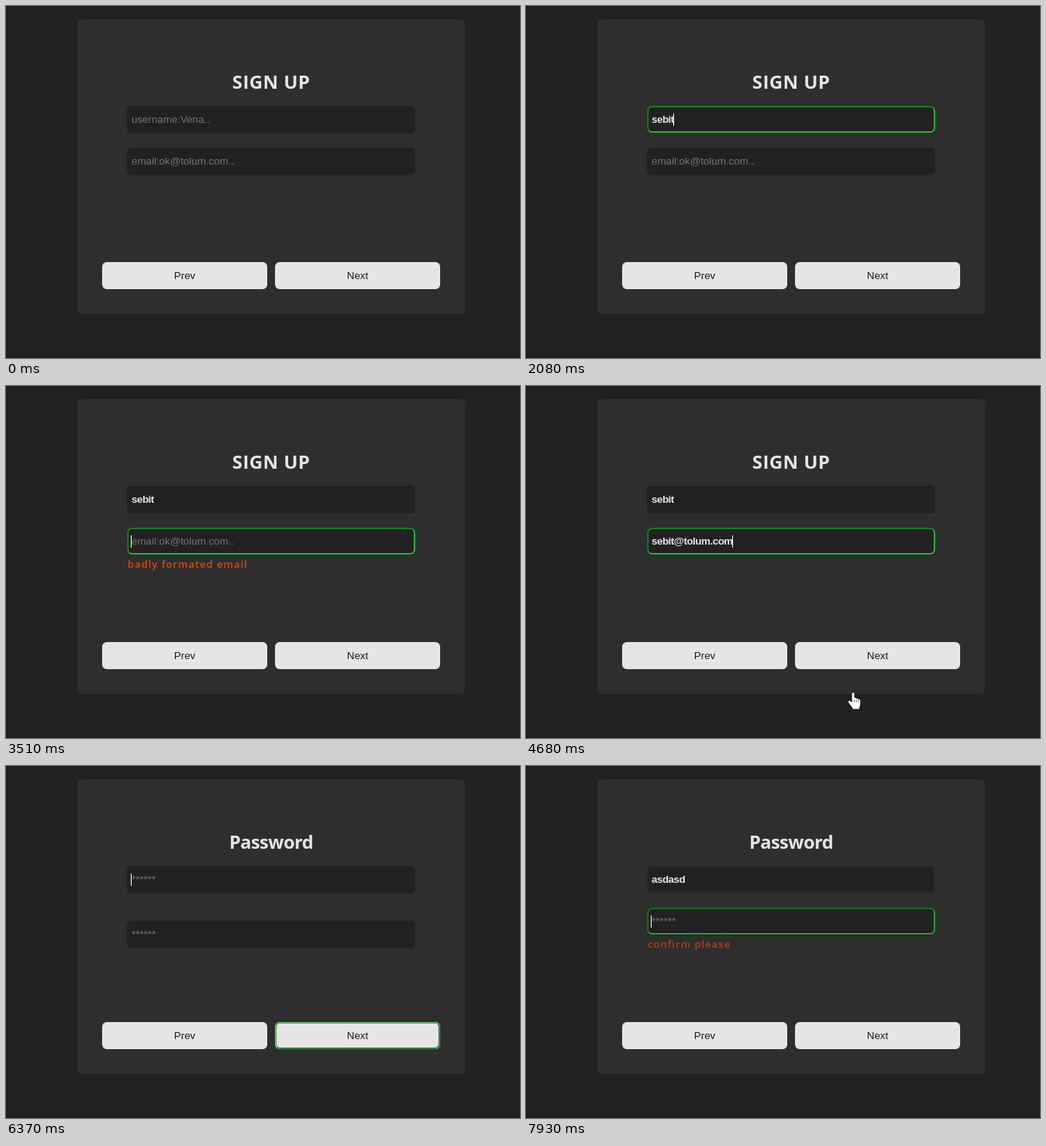
Recreate the animation shown at these times as an HTML page with a canvas. Size 663 by 455 pixels, loop 8 s.

```html
<!DOCTYPE html>
<html lang="en">
<head>
<meta charset="utf-8">
<title>Sign up form</title>
<style>
  html, body { margin: 0; width: 100%; height: 100%; overflow: hidden; background: #212121; }
  canvas { display: block; }
</style>
</head>
<body>
<canvas id="stage" width="663" height="455"></canvas>
<script>
const ctx = document.getElementById('stage').getContext('2d');
const LOOP = 8000, STEP = 130, BLINK = 520;
const SANS = '"Liberation Sans", Arial, sans-serif';
const HEAD = '"Open Sans", "Noto Sans", sans-serif';
const LIGHT = '#e5e5e5', DARK = '#212121';
const PAGE = { x: 124, y: 20, w: 436, h: 308 };

const USER = 'sebit', MAIL = 'sebit@tolum.com', PASS = 'asdasd';
const USER_KEYS = [1430, 1430, 1560, 1820, 2080];
const PASS_KEYS = [6890, 7020, 7150, 7280, 7410, 7540];
const MAIL_AT = 3640, SLIDE_AT = 5330, SLIDE_MS = 800;

// Focus interval of each control
const FOCUS = {
  user: [520, 2470],
  mail: [2470, SLIDE_AT],
  next: [SLIDE_AT, 6370],
  pass: [6370, 7800],
  confirm: [7800, Infinity]
};
const CARET_RESETS = [520, ...USER_KEYS, 2470, MAIL_AT, 6370, ...PASS_KEYS, 7800];

// Pointer path: time, x, y
const PATH = [
  [4550, 426, 422], [4680, 420, 396], [4940, 432, 362], [5200, 430, 344],
  [5330, 412, 338], [5460, 373, 272], [5720, 345, 150], [5980, 330, 60], [6240, 325, 30]
];

const clamp = v => Math.max(0, Math.min(1, v));

// CSS "ease" curve
function ease(x) {
  if (x <= 0 || x >= 1) return clamp(x);
  const curve = (s, a, b) => 3 * a * s * (1 - s) ** 2 + 3 * b * s * s * (1 - s) + s ** 3;
  let lo = 0, hi = 1;
  for (let i = 0; i < 24; i++) {
    const mid = (lo + hi) / 2;
    if (curve(mid, .25, .25) < x) lo = mid; else hi = mid;
  }
  return curve(lo, .1, 1);
}

function box(x, y, w, h, color, r = 6) {
  ctx.fillStyle = color;
  ctx.beginPath();
  ctx.roundRect(x, y, w, h, r);
  ctx.fill();
}

function text(str, x, y, font, color, { align = 'left', spacing = 0 } = {}) {
  ctx.font = font;
  ctx.fillStyle = color;
  ctx.textAlign = align;
  ctx.letterSpacing = spacing + 'px';
  ctx.fillText(str, x, y);
  return ctx.measureText(str).width;
}

function faded(alpha, draw) {
  if (alpha <= 0) return;
  ctx.save();
  ctx.globalAlpha *= alpha;
  draw();
  ctx.restore();
}

// Border with separate colours for the top-left and bottom-right sides
function bevel(x, y, w, h, topLeft, bottomRight) {
  const half = (cx, cy, color) => {
    ctx.save();
    ctx.beginPath();
    ctx.moveTo(x, y + h);
    ctx.lineTo(cx, cy);
    ctx.lineTo(x + w, y);
    ctx.lineTo(x + w - 10, y + 10);
    ctx.lineTo(x + 10, y + h - 10);
    ctx.closePath();
    ctx.clip();
    ctx.strokeStyle = color;
    ctx.lineWidth = 1.7;
    ctx.beginPath();
    ctx.roundRect(x + 1.2, y + 1.2, w - 2.4, h - 2.4, 5);
    ctx.stroke();
    ctx.restore();
  };
  half(x, y, topLeft);
  half(x + w, y + h, bottomRight);
}

function glow(name, t) {
  const [on, off] = FOCUS[name];
  return clamp((t - on) / 150) * (1 - clamp((t - off) / 150));
}

function caretOn(name, t) {
  const [on, off] = FOCUS[name];
  if (t < on || t >= off) return false;
  const last = Math.max(...CARET_RESETS.filter(r => r <= t));
  return Math.floor((t - last) / BLINK) % 2 === 0;
}

const typed = (str, keys, t) => str.slice(0, keys.filter(k => k <= t).length);

function field(name, y, value, hint, t) {
  box(156, y, 372, 35.5, DARK);
  faded(glow(name, t), () => bevel(156, y, 372, 35, '#128a26', '#27c938'));
  const w = value
    ? text(value, 162, y + 22, 'bold 13.333px ' + SANS, LIGHT, { spacing: -.45 })
    : (text(hint, 162, y + 22, '13.333px ' + SANS, '#757575'), 0);
  if (caretOn(name, t)) {
    ctx.fillStyle = '#fff';
    ctx.fillRect(Math.round(161 + w), y + 10, 1, 16);
  }
}

function error(str, since, t) {
  faded(clamp((t - since) / 180) * .9, () =>
    text(str, 157, 234.5, '600 13px ' + HEAD, '#f04a10', { spacing: 1 }));
}

function title(str, size, spacing) {
  text(str, 342, 107, `bold ${size}px ${HEAD}`, LIGHT, { align: 'center', spacing });
}

function account(t) {
  title('SIGN UP', 24, .4);
  field('user', 129, typed(USER, USER_KEYS, t), 'username:Vena..', t);
  field('mail', 183, t >= MAIL_AT ? MAIL : '', 'email:ok@tolum.com..', t);
  if (t < MAIL_AT) error('badly formated email', FOCUS.mail[0], t);
}

function password(t) {
  const pushed = t >= FOCUS.pass[0] && t < PASS_KEYS[0];
  title('Password', 23.5, -.5);
  field('pass', 129, typed(PASS, PASS_KEYS, t), '******', t);
  field('confirm', pushed ? 200 : 183, '', '******', t);
  error('confirm please', FOCUS.confirm[0], t);
}

function pages(t) {
  const p = ease((t - SLIDE_AT) / SLIDE_MS);
  ctx.save();
  ctx.beginPath();
  ctx.rect(PAGE.x, PAGE.y, PAGE.w, PAGE.h);
  ctx.clip();
  ctx.translate(-p * PAGE.w, 0);
  faded(1 - p, () => account(t));
  ctx.translate(PAGE.w, 0);
  faded(p, () => password(t));
  ctx.restore();
}

function button(label, x) {
  box(x, 331, 213, 35, LIGHT);
  text(label, x + 106.5, 353, '13.333px ' + SANS, '#1c1c1c', { align: 'center' });
}

const ARROW = new Path2D('M0 0V15.5L3.6 12.2L6.1 18L8.8 16.8L6.3 11.2H11Z');
const HAND = new Path2D('M5.5 1.8C5.5-.4 8.5-.4 8.5 1.8V7.5C9.2 6.7 11 7 11.2 8.2' +
  'C12 7.6 13.7 8 13.8 9.2C15 8.7 16.3 9.5 16.3 10.8V15C16.3 17 15 18.5 14.7 21.5H6.5' +
  'C6 18.8 3 16.5 1 13C-.2 11 2.2 9.8 3.6 11.4L5.5 13.3Z');

function pointer(t) {
  const i = PATH.findIndex(k => k[0] > t);
  if (i < 1) return;
  const [t0, x0, y0] = PATH[i - 1], [t1, x1, y1] = PATH[i];
  const p = (t - t0) / (t1 - t0);
  const shape = t < 5460 ? HAND : ARROW;
  ctx.save();
  ctx.translate(x0 + (x1 - x0) * p - (shape === HAND ? 5 : 0), y0 + (y1 - y0) * p);
  ctx.lineJoin = 'round';
  ctx.lineWidth = 1.6;
  ctx.strokeStyle = '#111';
  ctx.stroke(shape);
  ctx.fillStyle = '#fff';
  ctx.fill(shape);
  if (shape === HAND) {
    ctx.fillStyle = '#555';
    for (const x of [8.2, 10.8, 13.4]) ctx.fillRect(x, 9, .7, 4);
  }
  ctx.restore();
}

function draw(t) {
  ctx.fillStyle = DARK;
  ctx.fillRect(0, 0, 663, 455);
  box(92, 17, 500, 381, '#2e2e2e');
  pages(t);
  button('Prev', 124);
  button('Next', 347);
  faded(glow('next', t), () => bevel(347, 331, 213, 35, '#43b04a', '#17692a'));
  pointer(t);
}

const start = performance.now();
function tick() {
  const t = (performance.now() - start) % LOOP;
  draw(Math.floor(t / STEP) * STEP);
  requestAnimationFrame(tick);
}
tick();
</script>
</body>
</html>
```
